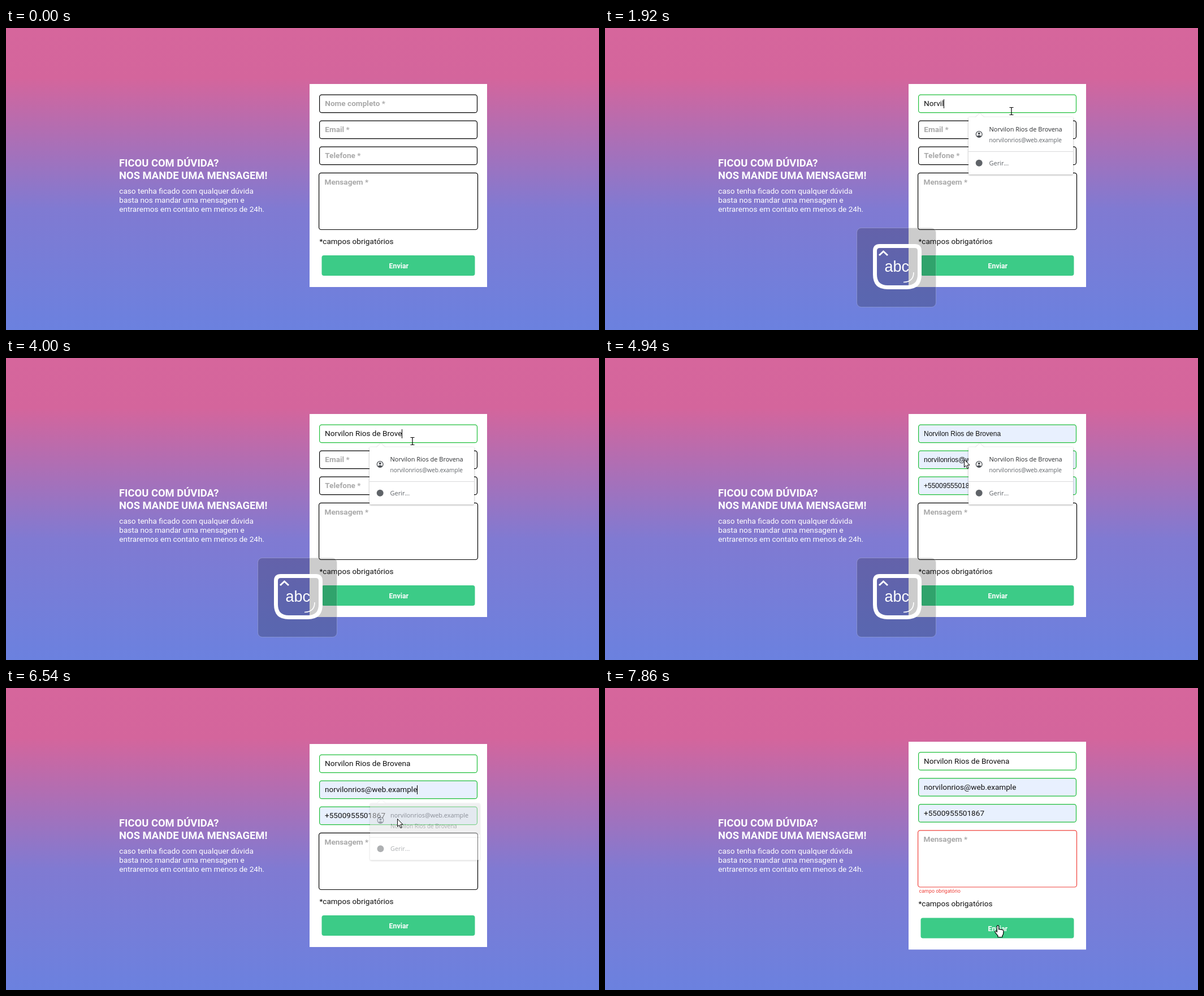
Write an HTML page that moves like this. It is 1049x534 px and loops after 8000 ms.

```html
<!DOCTYPE html>
<html lang="pt">
<head>
<meta charset="utf-8">
<title>Contato</title>
<style>
  html, body { margin: 0; width: 100%; height: 100%; overflow: hidden; }
  svg { display: block; width: 1049px; height: 534px; }
  text { font-family: Roboto, sans-serif; font-size: 13.6px; white-space: pre; }
  .title { font-size: 18.4px; font-weight: 700; fill: #fff; }
  .lead { fill: #fff; }
  .label { font-weight: 700; fill: #a9a9a9; }
  .value, .note { fill: #111; }
  .preview { font: 12px "Liberation Sans", Arial, sans-serif; }
  .error { font-size: 8.96px; fill: #f0413a; }
  .send { font-size: 12.3px; font-weight: 700; fill: #fff; text-anchor: middle; }
  .main, .sub { font-family: "Open Sans", sans-serif; font-size: 11px; fill: #2b2d30; }
  .sub { font-size: 10.15px; fill: #5f6368; }
  .more { font-size: 11px; }
  .box { filter: drop-shadow(0 1px 1.5px rgba(0, 0, 0, .35)); }
  .keytext { font-family: "Liberation Sans", Arial, sans-serif; font-size: 27px; fill: #fff; text-anchor: middle; }
</style>
</head>
<body>
<svg viewBox="0 0 1049 534">
  <defs>
    <linearGradient id="sky" x1="0" y1="0" x2="0" y2="1">
      <stop offset="0" stop-color="#d6669c"/>
      <stop offset=".165" stop-color="#d4659c"/>
      <stop offset=".6" stop-color="#807ad2"/>
      <stop offset="1" stop-color="#6b81df"/>
    </linearGradient>
  </defs>
  <rect width="1049" height="534" fill="url(#sky)"/>
  <text class="title" x="200" y="245">FICOU COM DÚVIDA?</text>
  <text class="title" x="200" y="266.5">NOS MANDE UMA MENSAGEM!</text>
  <text class="lead" x="200.3" y="293">caso tenha ficado com qualquer dúvida</text>
  <text class="lead" x="200.3" y="309">basta nos mandar uma mensagem e</text>
  <text class="lead" x="200.3" y="325">entraremos em contato em menos de 24h.</text>

  <rect id="card" x="537" width="314" fill="#fff"/>
  <g id="upper">
    <g id="fields"></g>
    <rect id="area" x="553.6" y="256.3" width="280.9" height="100.2" rx="4" fill="#fff" stroke-width="1.2"/>
    <text class="label" x="563.5" y="276.5">Mensagem *</text>
    <path id="caret" stroke="#000" d="M0 126V142"/>
  </g>
  <text id="error" class="error" x="555.5" y="362.3">campo obrigatório</text>
  <g id="lower">
    <text class="note" x="554.5" y="381.5">*campos obrigatórios</text>
    <rect x="558.5" y="402" width="271" height="36" rx="4" fill="#3ccb87"/>
    <text class="send" x="694.8" y="425">Enviar</text>
  </g>

  <g id="popups"></g>

  <g id="caps">
    <rect x="445.5" y="353.5" width="140" height="140" rx="8" fill="#000" fill-opacity=".2" stroke="#fff" stroke-opacity=".22"/>
    <g fill="none" stroke="#fff">
      <path stroke-width="7" d="M486 385.5H548Q556.5 385.5 556.5 394V436Q556.5 458.5 534 458.5H500Q477.5 458.5 477.5 436V394Q477.5 385.5 486 385.5Z"/>
      <path stroke-width="3" d="M485 402L492.5 395L500 402"/>
      <path stroke-width="1.6" d="M546 432Q546 449 528 449.5"/>
    </g>
    <text id="keytext" class="keytext" x="516.3" y="431"></text>
  </g>

  <g id="pointer">
    <g id="beam" fill="none" stroke="#000" stroke-width="1.2">
      <path d="M-3.5 -6.5H-1Q0 -6.5 0 -5.5Q0 -6.5 1 -6.5H3.5M0 -5.5V5.5M-3.5 6.5H-1Q0 6.5 0 5.5Q0 6.5 1 6.5H3.5"/>
    </g>
    <path id="arrow" fill="#fff" stroke="#000" d="M.5 .5V14L3.6 11.1L6 16.6L8.2 15.6L5.9 10.3H10Z"/>
    <path id="hand" fill="#fff" stroke="#000" stroke-width="1.2" stroke-linejoin="round"
      d="M-1.6 11.5V1.4a1.6 1.6 0 0 1 3.2 0V7q1.5-1.4 3 .2 1.5-1 2.8.5 2.4-.6 2.4 1.8V13q0 3-2 5v2.5H0V18q-2.5-2.5-5-6.5-.6-2 1.5-2 1 .3 1.9 2z"/>
  </g>
</svg>
<script>
const LOOP = 8000, TICK = 69.5, MOVE = 4730;
const NAME = 'Norvilon Rios de Brovena';
const MAIL = 'norvilonrios@web.example';
const PHONE = '+5500955501867';
const GREEN = '#1fbf3a';

// Moment each letter of the name is typed
const KEYS = [1210, 1420, 1520, 1620, 1720, 1920, 2020, 2120, 2320, 2530, 2670, 2740,
  2850, 2950, 3060, 3130, 3220, 3520, 3670, 3780, 3890, 4000, 4270, 4340];

// Pointer path: time, x, y, shape
const PATH = [
  [190, 785, 217, 'beam'], [269, 785, 217, 'beam'],
  [270, 725, 147, 'beam'], [519, 725, 147, 'beam'],
  [520, 719, 147, 'beam'], [4660, 719, 147, 'beam'],
  [4725, 708, 163, 'arrow'], [4935, 636, 179, 'arrow'],
  [5005, 620, 180, 'beam'], [5700, 620, 180, 'beam'],
  [5835, 645, 203, 'arrow'], [6045, 671, 220, 'arrow'],
  [6255, 692, 231, 'arrow'], [6540, 692, 231, 'arrow'],
  [6605, 692, 238, 'beam'], [6880, 696, 352, 'beam'],
  [6885, 697, 365, 'arrow'], [7015, 698, 404, 'hand'],
  [7155, 699, 414, 'hand'], [7225, 701, 440, 'arrow'],
  [7370, 701, 440, 'arrow'], [7375, 701, 441, 'arrow'],
  [7500, 701, 441, 'arrow'], [7575, 695, 428, 'hand'],
  [7645, 695, 420, 'hand'], [LOOP, 695, 420, 'hand']
];

const $ = id => document.getElementById(id);
const set = (node, attrs) => { for (const k in attrs) node.setAttribute(k, attrs[k]); };
const show = (node, on) => set(node, { visibility: on ? 'visible' : 'hidden' });
const clamp = v => Math.max(0, Math.min(1, v));
const within = (t, a, b) => t >= a && t < b;
const ramp = (t, a, b) => clamp((t - a) / (b - a));

$('fields').innerHTML = ['Nome completo *', 'Email *', 'Telefone *'].map((label, i) => `
  <g transform="translate(0 ${i * 46})">
    <rect x="554.6" y="118.1" width="278.9" height="31.6" rx="4" stroke-width="1.2"/>
    <text class="label" x="564.3" y="138">${label}</text>
    <text class="value" x="564" y="138"></text>
  </g>`).join('');

const fields = [...$('fields').children].map(g => {
  const [rect, label, value] = g.children;
  return { rect, label, value };
});

function popup(y, width, main, sub) {
  return `<g>
    <g transform="translate(0 ${y})">
      <path class="box" fill="#fff" d="M645 157.5H656L663 151L670 157.5H${641 + width}a2 2 0 0 1 2 2V257a2 2 0 0 1-2 2H645a2 2 0 0 1-2-2V159.5a2 2 0 0 1 2-2Z"/>
      <rect class="row" x="643" y="157.5" width="${width}" height="56" fill="#e2e3e4"/>
      <path stroke="#d9dadb" d="M643 218.5H${643 + width}"/>
      <circle cx="661.7" cy="188" r="5.4" fill="none" stroke="#4d5156" stroke-width="1.3"/>
      <circle cx="661.7" cy="186.4" r="2" fill="#4d5156"/>
      <path fill="#4d5156" d="M657.7 191.6Q661.7 187.6 665.7 191.6Q661.7 195.6 657.7 191.6Z"/>
      <circle cx="661.7" cy="238.8" r="6" fill="#5f6368"/>
      <text class="main" x="679.5" y="182.5">${main}</text>
      <text class="sub" x="679.5" y="201.8">${sub}</text>
      <text class="sub more" x="679.5" y="243">Gerir...</text>
    </g></g>`;
}
$('popups').innerHTML = popup(0, 185, NAME, MAIL) + popup(46, 196, MAIL, NAME);
const popups = [...$('popups').children];

function drawField(field, text, mode) {
  const auto = mode === 'preview' || mode === 'filled';
  set(field.rect, { stroke: text ? GREEN : '#000', fill: auto ? '#e8f0fe' : '#fff' });
  set(field.value, { class: mode === 'preview' ? 'value preview' : 'value' });
  field.value.textContent = text;
  show(field.label, !text);
}

function drawPopup(node, opacity, hover) {
  const s = .98 + .02 * opacity;
  set(node, { opacity, transform: `translate(740 230) scale(${s}) translate(-740 -230)` });
  show(node, opacity > 0);
  show(node.querySelector('.row'), opacity > 0 && hover);
}

function drawPointer(t) {
  show($('pointer'), t >= PATH[0][0]);
  let i = 0;
  while (i < PATH.length - 2 && t >= PATH[i + 1][0]) i++;
  const [t0, x0, y0, shape] = PATH[i], [t1, x1, y1] = PATH[i + 1];
  const k = ramp(t, t0, t1);
  const x = Math.round(x0 + (x1 - x0) * k), y = Math.round(y0 + (y1 - y0) * k);
  set($('pointer'), { transform: `translate(${x} ${y})` });
  for (const id of ['beam', 'arrow', 'hand']) set($(id), { display: id === shape ? 'inline' : 'none' });
}

function drawCaret(t) {
  const row = t < 5000 ? 0 : 1;
  const on = within(t, 520, 4795) || within(t, 5145, 5650) || within(t, 6465, 6970);
  const { value } = fields[row];
  const x = 564 + (value.textContent ? value.getComputedTextLength() : 0);
  set($('caret'), { transform: `translate(${Math.round(x) + .5} ${row * 46})` });
  show($('caret'), on);
}

function render(now) {
  // Pointer and fades advance in ticks, like a screen capture
  const t = now < MOVE - 5 ? now : MOVE + Math.floor((now - MOVE + 5) / TICK) * TICK;

  const both = within(t, 4795, 5005);
  const filled = t >= 6465;
  const contact = filled ? 'filled' : both || t >= 6115 ? 'preview' : '';
  const typed = NAME.slice(0, KEYS.filter(k => t >= k).length);
  drawField(fields[0], typed, both ? 'preview' : 'typed');
  drawField(fields[1], contact && MAIL, contact);
  drawField(fields[2], contact && PHONE, contact);
  drawCaret(t);

  const appear = t < 520 ? 0 : t < 600 ? .35 : t < 670 ? .75 : 1;
  drawPopup(popups[0], appear * (1 - ramp(t, 5080, 5220)), within(t, 4725, 4930));
  drawPopup(popups[1], ramp(t, 5280, 5485) * (1 - ramp(t, 6470, 6605)), t >= 6115);

  const upper = within(t, 1000, 1280) || within(t, 2390, 2600) || within(t, 3320, 3520);
  $('keytext').textContent = upper ? 'ABC' : 'abc';
  $('keytext').style.fontSize = upper ? '25px' : '27px';
  const capsIn = t < 1000 ? 0 : t < 1070 ? .5 : 1;
  set($('caps'), { opacity: capsIn * (1 - ramp(t, 5500, 6535)) });

  const failed = t >= 7710;
  set($('card'), failed ? { y: 95, height: 367.5 } : { y: 99, height: 359 });
  set($('upper'), { transform: `translate(0 ${failed ? -4.5 : 0})` });
  set($('lower'), { transform: `translate(0 ${failed ? 4.5 : 0})` });
  set($('area'), { stroke: failed ? '#f0413a' : '#000' });
  show($('error'), failed);

  drawPointer(t);
}

function loop() {
  render(performance.now() % LOOP);
  requestAnimationFrame(loop);
}
loop();
</script>
</body>
</html>
```
